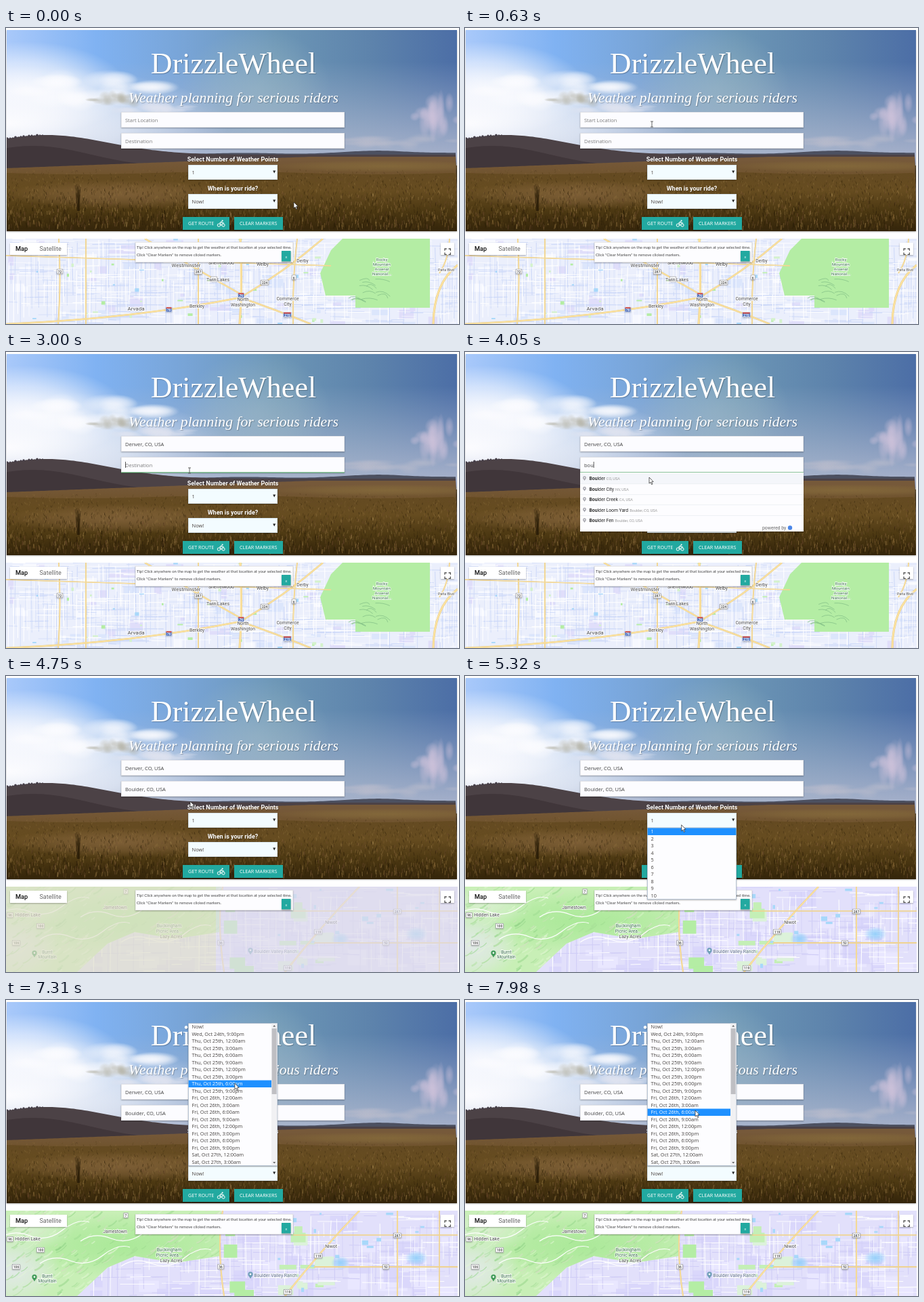
An HTML page with a canvas for the animation above (8000 ms loop, 669 by 437 pixels).

```html
<!DOCTYPE html>
<html lang="en">
<head>
<meta charset="utf-8">
<title>Ride weather planner</title>
<style>
html, body { margin: 0; width: 100%; height: 100%; overflow: hidden; background: #fff; }
canvas { display: block; width: 669px; height: 437px; }
</style>
</head>
<body>
<canvas id="stage" width="669" height="437"></canvas>
<script>
const W = 669, H = 437, LOOP = 8000, MAP_TOP = 311, MAP_W = 667;
const SANS = '"Open Sans", sans-serif', ROBOTO = 'Roboto, sans-serif';
const SERIF = '"Liberation Serif", serif', LATO = 'Lato, sans-serif';
const TEAL = '#22a9a0', GREEN = '#b4eda4', WATER = '#a8d8fa', PARK_TEXT = '#3d7050';
let g = document.getElementById('stage').getContext('2d');

// ---------- helpers ----------

function rng(seed) {
  return () => {
    seed = (seed + 0x6D2B79F5) | 0;
    let t = Math.imul(seed ^ (seed >>> 15), 1 | seed);
    t = (t + Math.imul(t ^ (t >>> 7), 61 | t)) ^ t;
    return ((t ^ (t >>> 14)) >>> 0) / 4294967296;
  };
}

function layer(paint) {
  const c = document.createElement('canvas');
  c.width = W;
  c.height = H;
  const saved = g;
  g = c.getContext('2d');
  paint();
  g = saved;
  return c;
}

function box(x, y, w, h, fill) {
  g.fillStyle = fill;
  g.fillRect(x, y, w, h);
}

function panel(x, y, w, h, fill, edge) {
  g.save();
  g.shadowColor = 'rgba(0,0,0,.3)';
  g.shadowBlur = 2;
  g.shadowOffsetY = 1;
  box(x, y, w, h, fill);
  g.restore();
  if (!edge) return;
  g.strokeStyle = edge;
  g.lineWidth = .6;
  g.strokeRect(x + .3, y + .3, w - .6, h - .6);
}

function text(s, x, y, font, color, align = 'left') {
  g.font = font;
  g.fillStyle = color;
  g.textAlign = align;
  g.fillText(s, x, y);
}

function shape(d, x, y, fill, stroke, width = .7) {
  const p = new Path2D(d);
  g.save();
  g.translate(x, y);
  if (fill) {
    g.fillStyle = fill;
    g.fill(p);
  }
  if (stroke) {
    g.strokeStyle = stroke;
    g.lineWidth = width;
    g.stroke(p);
  }
  g.restore();
}

function line(x0, y0, x1, y1, color, width = 1) {
  g.beginPath();
  g.moveTo(x0, y0);
  g.lineTo(x1, y1);
  g.strokeStyle = color;
  g.lineWidth = width;
  g.stroke();
}

function disc(x, y, r, fill) {
  g.beginPath();
  g.arc(x, y, r, 0, 7);
  g.fillStyle = fill;
  g.fill();
}

function blob(x, y, rx, ry, rgb, a) {
  g.save();
  g.translate(x, y);
  g.scale(rx, ry);
  const f = g.createRadialGradient(0, 0, 0, 0, 0, 1);
  f.addColorStop(0, `rgba(${rgb},${a})`);
  f.addColorStop(.55, `rgba(${rgb},${a * .6})`);
  f.addColorStop(1, `rgba(${rgb},0)`);
  g.fillStyle = f;
  g.fillRect(-1, -1, 2, 2);
  g.restore();
}

function fade(x1, y0, y1, ...colors) {
  const f = g.createLinearGradient(0, y0, x1, y1);
  colors.forEach((c, i) => f.addColorStop(i / (colors.length - 1), c));
  return f;
}

// ---------- hero picture ----------

function cloud(seed, x, y, w, h, rgb, a) {
  const r = rng(seed);
  for (let i = 0; i < 16; i++) {
    const u = r() * 2 - 1, k = 1 - u * u * .7;
    blob(x + u * w, y + (r() - .5) * h * k, w * (.15 + r() * .25), h * (.3 + r() * .4) * k, rgb, a);
  }
}

function ridge(height, fill) {
  g.beginPath();
  g.moveTo(0, 300);
  for (let x = 0; x <= MAP_W; x += 4) g.lineTo(x, height(x));
  g.lineTo(MAP_W, 300);
  g.fillStyle = fill;
  g.fill();
}

const bump = (x, center, width) => Math.exp(-(((x - center) / width) ** 2));

function sky() {
  box(0, 3, MAP_W, 200, fade(MAP_W, 0, 0, '#a9c9fa', '#80b2f2', '#78a4d6', '#6c96b6', '#5e84ac', '#4c6ea6'));
  box(0, 3, MAP_W, 200, fade(0, 50, 190, 'rgba(176,188,212,0)', 'rgba(176,184,206,.9)'));
  blob(0, 140, 330, 85, '252,252,255', 1);
  blob(30, 90, 150, 70, '252,252,255', .9);
  blob(370, 90, 110, 90, '164,190,198', .45);
  cloud(5, 130, 92, 110, 34, '252,252,255', .6);
  cloud(8, 165, 106, 42, 14, '176,174,160', .4);
  cloud(9, 215, 120, 60, 16, '225,228,240', .5);
  cloud(14, 636, 128, 36, 44, '206,194,218', .5);
  cloud(17, 580, 168, 90, 14, '186,188,204', .4);
}

function grass() {
  const r = rng(7), tones = ['#241806', '#38280c', '#8a6a38', '#9a7c48', '#55401a', '#6c4a30'];
  const top = x => 207 - 17 * Math.min(1, x / 450);
  ridge(top, fade(0, 195, 300, '#76593a', '#6c5026', '#53400f', '#33240a'));
  ridge(x => 214 + 2 * Math.sin(x / 70), fade(0, 210, 300, '#644a22', '#664c20', '#4c3812', '#33240a'));
  blob(170, 246, 170, 22, '142,108,70', .6);
  blob(560, 204, 170, 9, '140,114,62', .6);
  for (let i = 0; i < 3200; i++) {
    const d = r() ** .8, x = r() * MAP_W, y = 210 + d * 89;
    g.globalAlpha = .3 + r() * .4;
    line(x, y, x + (r() - .5) * 3, Math.max(top(x), y - 2 - d * 5), tones[Math.floor(r() * 6)], .5 + d * .7);
  }
  g.globalAlpha = .6;
  for (let i = 0; i < 14; i++) line(105 + r() * 4, 270, 102 + r() * 10, 230 + r() * 20, '#2c1e0a', .8);
  g.globalAlpha = 1;
}

function landscape() {
  sky();
  ridge(x => 185 - 4 * bump(x, 560, 60) - Math.sin(x / 25) * .6, '#4c5060');
  ridge(x => 190 - 3 * bump(x, 470, 60), '#5a4f45');
  const hill = x => 187 - 29 * bump(x, 60, 130);
  ridge(hill, '#4c4246');
  ridge(x => 206 - 32 * bump(x, 40, 120), '#40363a');
  for (let x = 2; x < 55; x += 4) disc(x, hill(x), 1.2 + Math.sin(x) * .7, '#463f48');
  grass();
}

function bike(x, y) {
  shape('M5.8 8.6V6.4L3.8 4.6L6 2.6L7.6 4.4H9.8', x, y, null, '#fff', 1.1);
  for (const cx of [2.3, 9]) shape('M-2.1 0a2.1 2.1 0 1 0 4.2 0a2.1 2.1 0 1 0 -4.2 0', x + cx, y + 7.6, null, '#fff', 1);
  disc(x + 7.6, y + 1.1, 1.1, '#fff');
}

function button(x, w, caption) {
  panel(x, 279, w, 19, TEAL);
  text(caption, x + 8, 291.2, `7.2px ${SANS}`, '#fff');
}

function hero() {
  panel(1, 3, 665, 297, '#33240a');
  g.save();
  g.beginPath();
  g.rect(1, 3, 665, 297);
  g.clip();
  landscape();
  g.restore();
  g.save();
  g.shadowColor = 'rgba(0,0,0,.25)';
  g.shadowBlur = 1;
  g.shadowOffsetX = g.shadowOffsetY = 1;
  text('DrizzleWheel', 336, 67, `44px ${SERIF}`, '#fff', 'center');
  text('Weather planning for serious riders', 336, 110, `italic 21.7px ${SERIF}`, '#fff', 'center');
  text('Select Number of Weather Points', 335, 196.5, `bold 9px ${ROBOTO}`, '#fff', 'center');
  text('When is your ride?', 335, 239.5, `bold 9px ${ROBOTO}`, '#fff', 'center');
  g.restore();
  button(261, 69, 'GET ROUTE');
  button(337, 72, 'CLEAR MARKERS');
  bike(312, 283.5);
}

// ---------- maps ----------

function place(s, x, y, size = 6.8, color = '#4c4c50') {
  s.split('|').forEach((row, i) => {
    g.font = `${size}px ${ROBOTO}`;
    g.textAlign = 'center';
    g.strokeStyle = 'rgba(255,255,255,.8)';
    g.lineWidth = 1.8;
    g.strokeText(row, x, y + i * (size + 1));
    text(row, x, y + i * (size + 1), g.font, color, 'center');
  });
}

function shield(s, x, y) {
  const w = s.length * 2.6 + 4, interstate = s === '76' || s === '270';
  panel(x - w / 2, y - 3.7, w, 7.4, interstate ? '#4468b8' : '#fff', interstate ? '#fff' : '#8a8a90');
  if (interstate) box(x - w / 2 + .6, y - 3.4, w - 1.2, 1.8, '#d8483c');
  text(s, x, y + 2.3, `bold 4.8px ${ROBOTO}`, interstate ? '#fff' : '#555', 'center');
}

// A curve from one point to another; u places its route number.
function road(x0, y0, x1, y1, { bend = 0, width = 1.2, sign, u = .5 } = {}) {
  const cx = (x0 + x1) / 2 + bend, cy = (y0 + y1) / 2 + bend;
  const d = `M${x0} ${y0}Q${cx} ${cy} ${x1} ${y1}`;
  shape(d, 0, 0, null, '#e4c682', width + .7);
  shape(d, 0, 0, null, '#fbe2a0', width);
  const at = (a, c, b) => (1 - u) ** 2 * a + 2 * u * (1 - u) * c + u * u * b;
  return sign ? () => shield(sign, at(x0, cx, x1), at(y0, cy, y1)) : () => {};
}

function streets(seed, x0, step, color) {
  const r = rng(seed);
  for (let x = x0; x < MAP_W; x += step * (.5 + r())) {
    const y = MAP_TOP + r() * 70;
    line(x, y, x + (r() - .5) * 3, y + 20 + r() * 80, color, .5 + r() * .7);
  }
  for (let i = 0; i < 1100 / step; i++) {
    const x = x0 + r() * (MAP_W - x0), y = MAP_TOP + r() * 126;
    line(x, y, x + 10 + r() * 60, y + (r() - .5) * 2, color, .5 + r() * .7);
  }
}

function patches(seed, x0, x1, count, size, colors) {
  const r = rng(seed);
  for (let i = 0; i < count; i++) {
    box(x0 + r() * (x1 - x0), MAP_TOP + r() * 126, size * (.3 + r()), size * (.2 + r() * .6), colors[i % colors.length]);
  }
}

function mapBase(fill, paint) {
  g.beginPath();
  g.rect(0, MAP_TOP, MAP_W, 126);
  g.clip();
  box(0, MAP_TOP, MAP_W, 126, fill);
  paint();
}

function denverMap() {
  patches(31, 0, 660, 90, 20, ['#dce6fc', '#f6f8ff', '#e0defa']);
  streets(3, 0, 6, '#ccd8f8');
  streets(4, 0, 6, '#ffffff');
  patches(6, 0, 470, 36, 7, [WATER, GREEN, '#d4f2cc']);
  shape('M497 311H626V413H516V395H472L464 362L480 328Z', 0, 0, GREEN);
  const r = rng(9);
  for (let i = 0; i < 12; i++) {
    const x = 495 + r() * 55, y = 370 + r() * 34;
    shape(`q${6 + r() * 8} ${-8 * r()} ${12 + r() * 14} ${6 * r()}`.replace(/^/, 'M0 0'), x, y, null, '#86c288', .8);
  }
  const signs = [
    road(78, 311, 77, 437, { bend: 4, sign: '72', u: .37 }),
    road(0, 336, 480, 351, { width: 1 }),
    road(118, 311, 118, 437),
    road(284, 311, 284, 437, { sign: '287', u: .39 }),
    road(205, 311, 345, 392, { bend: 3, width: 1.8, sign: '36', u: .72 }),
    road(346, 311, 345, 437, { bend: 4, width: 2.4, sign: '76', u: .65 }),
    road(0, 437, 346, 398, { bend: 12, width: 1.8, sign: '76', u: .68 }),
    road(346, 398, 468, 311, { bend: 5, width: 1.8, sign: '224', u: .28 }),
    road(346, 398, 450, 437, { bend: -3, width: 1.8, sign: '270', u: .68 }),
    road(424, 437, 430, 311, { bend: -4, sign: '6', u: .53 }),
    road(667, 350, 631, 437, { bend: -17, width: 2.4 }),
    road(655, 311, 640, 362, { bend: 6 })];
  signs.forEach(draw => draw());
  place('Westminster', 266, 352.5, 7.6);
  place('Sherrelwood', 318, 349);
  place('Twin Lakes', 313, 374);
  place('Welby', 379, 351);
  place('Derby', 438, 346);
  place('North|Washington', 350, 403);
  place('Commerce|City', 416, 402);
  place('Arvada', 192, 416.5, 8);
  place('Berkley', 282, 413);
  place('Rocky|Mountain|Arsenal|National...', 555, 343.5, 6.2, PARK_TEXT);
  place('Peña Blvd', 650, 359, 5.4);
}

function terrain() {
  const r = rng(12);
  g.save();
  g.clip(new Path2D('M0 311H318L316 378L250 388L190 378L150 395L105 437H0Z'));
  box(0, MAP_TOP, 320, 126, '#c8efb6');
  blob(170, 362, 180, 48, '168,232,150', .9);
  blob(10, 400, 70, 50, '228,232,236', .9);
  blob(30, 340, 70, 30, '220,240,212', .8);
  for (let i = 0; i < 300; i++) {
    const x = r() * 318, y = MAP_TOP + r() * 126, n = 4 + r() * 12;
    g.globalAlpha = .25 + r() * .4;
    shape(`M0 0Q${n * .5} ${-n * .1} ${n} ${-n * .7}`, x, y, null, ['#93d488', '#e2f6d4', '#a5dc94', '#d6dcc4'][i % 4], 1 + r() * 2);
  }
  g.restore();
}

function boulderMap() {
  patches(20, 100, 660, 60, 34, ['#e9e7ff', '#dad7fb']);
  streets(21, 120, 11, '#cfccf6');
  streets(22, 120, 11, '#ffffff');
  terrain();
  patches(25, 316, 340, 7, 26, [GREEN]);
  patches(26, 345, 480, 14, 22, ['#c4efb6', '#dcf2da']);
  patches(27, 330, 660, 16, 9, [WATER]);
  blob(606, 381, 17, 11, '150,208,250', 1);
  blob(494, 388, 14, 10, '150,208,250', 1);
  for (let i = 0; i < 4; i++) shape('M0 0q20 -14 45 -4t48 -8t40 -12', i * 60 - 10, 352 + (i * 37) % 70, null, '#fff', 1.2);
  const signs = [
    road(320, 311, 322, 437, { bend: -10, width: 1.4, sign: '36', u: .69 }),
    road(412, 437, 522, 311, { bend: -3, width: 1.8, sign: '119', u: .46 }),
    road(578, 311, 578, 437, { width: 1.4, sign: '287', u: .29 }),
    road(455, 394, 667, 394, { sign: '52' }),
    road(424, 347, 667, 347, { width: .8 }),
    road(640, 311, 640, 437, { width: .8 })];
  signs.forEach(draw => draw());
  shield('7', 177, 318);
  shield('96', 6, 353);
  shield('100', 51, 369);
  shield('106', 15, 394);
  shield('119', 416, 431);
  place('Hidden Lake', 32, 354.5);
  place('Jamestown', 161, 343.5);
  place('Buckingham|Picnic Area...', 241, 371, 6.6, PARK_TEXT);
  place('Lazy Acres', 244, 386.5);
  place('Burnt|Mountain', 61, 409.5, 6.4, PARK_TEXT);
  place('Boulder Valley Ranch', 398, 409, 6.8, '#5a6a88');
  place('Niwot', 480, 366);
  pin(42, 410, '#3f9a58', 1.5);
  pin(361, 406, '#6f9fb8', 1.5);
}

function pin(x, y, color, k = 1) {
  disc(x, y - .8 * k, 2.4 * k, color);
  shape(`M${-2.2 * k} 0H${2.2 * k}L0 ${3.6 * k}Z`, x, y, color);
  disc(x, y - .8 * k, .9 * k, '#fff');
}

function mapControls() {
  panel(6, 317, 84, 18, '#fff');
  text('Map', 14, 328.6, `500 9.2px ${ROBOTO}`, '#111');
  text('Satellite', 49.5, 328.6, `9px ${ROBOTO}`, '#666');
  panel(642, 317, 20, 18, '#fff');
  for (const sx of [1, -1])
    for (const sy of [1, -1])
      shape(`M${1.4 * sx} ${4.2 * sy}H${4.2 * sx}V${1.4 * sy}`, 652.2, 330.2, null, '#555', 1.3);
  panel(191, 316, 233, 30, '#fdfdff', '#ddd');
  const font = `5.9px ${LATO}`;
  text('Tip! Click anywhere on the map to get the weather at that location at your selected time.', 193, 326, font, '#444');
  text('Click "Clear Markers" to remove clicked markers.', 193, 337, font, '#444');
  panel(407, 329, 13.5, 15.5, TEAL);
  text('x', 413.7, 339.5, `6px ${SANS}`, '#fff', 'center');
}

const TOP = layer(hero);
const DENVER = layer(() => mapBase('#ebeffc', denverMap));
const BOULDER = layer(() => mapBase('#e2e0fb', boulderMap));
const CONTROLS = layer(mapControls);

// ---------- form ----------

const TIP_STEP = 15.5, ROW = 10.5;
const START_TIPS = {
  y: 147,
  rows: ['Denver|CO, USA',
    'Denver Hall of Rivers & Lanterns|Larkmoor Boulevard, Denver, CO, USA',
    'Denver Loom Yard|Greenwood Village, CO, USA',
    'Denver Crumpet Pantry|East Thornby Avenue, Denver, CO, USA',
    'Denver Fen|Wickle Street, Denver, CO, USA']
};
const END_TIPS = {
  y: 178,
  rows: ['Boulder|CO, USA', 'Boulder City|NV, USA', 'Boulder Creek|CA, USA',
    'Boulder Loom Yard|Boulder, CO, USA', 'Boulder Fen|Boulder, CO, USA']
};

function rideTime(i) {
  if (!i) return 'Now!';
  const hours = 21 + (i - 1) * 3, day = Math.floor(hours / 24), h = hours % 24;
  return `${['Wed', 'Thu', 'Fri', 'Sat'][day]}, Oct ${24 + day}th, ${h % 12 || 12}:00${h < 12 ? 'am' : 'pm'}`;
}

const COUNTS = { y: 224, rows: Array.from({ length: 10 }, (_, i) => String(i + 1)) };
const TIMES = { y: 34, scroll: true, rows: Array.from({ length: 20 }, (_, i) => rideTime(i)) };
const rowY = (list, i) => list.y + i * ROW + 3;

// Moments at which the form changes, in ms.
const AT = {
  focusStart: 800, typeStart: 1240, pickStart: 2250, focusEnd: 2720, typeEnd: 3380,
  pickEnd: 4300, pan: 4600, openCount: 5190, pickCount: 5720, openTime: 6460
};

// Each move: start, end, destination.
const MOVES = [
  [60, 600, 276, 142], [900, 1150, 271, 138], [1750, 2100, 269, START_TIPS.y + 7],
  [AT.pickStart + 100, 2700, 271, 175], [3700, 4050, 272, END_TIPS.y + 7],
  [4850, 5120, 318, 212], [AT.openCount + 40, 5580, 328, rowY(COUNTS, 3)],
  [AT.pickCount + 60, 6050, 327, 251], [AT.openTime - 20, 7380, 338, rowY(TIMES, 8)],
  [7400, 7820, 340, rowY(TIMES, 12)]];

function mouseAt(t) {
  let x = 425, y = 257;
  for (const [from, to, tx, ty] of MOVES) {
    const u = Math.min(1, Math.max(0, (t - from) / (to - from))), e = u * u * (3 - 2 * u);
    x += (tx - x) * e;
    y += (ty - y) * e;
  }
  return [x, y];
}

const typed = (t, word, from, pace) => word.slice(0, Math.max(0, Math.floor((t - from) / pace) + 1));

function field(y, value, hint, focused, blink) {
  panel(170, y, 330, 23, '#fcfcff', '#d8d8dc');
  text(value || hint, 176, y + 14.6, `7.5px ${SANS}`, value ? '#404040' : '#7c7c7c');
  if (!focused) return;
  box(170, y + 22.4, 330, 1, '#57b56a');
  if (blink) box(176 + (value ? g.measureText(value).width : 0), y + 7, .8, 9, '#333');
}

function select(y, value) {
  panel(269, y, 132, 22, '#f3fcff', '#c4d0d8');
  text(value, 274.5, y + 13.6, `7.5px ${SANS}`, '#453c38');
  shape('M-2 0H2L0 4Z', 396.2, y + 8.4, '#222');
}

function suggestions({ y, rows }, prefix, my) {
  panel(170, y, 330, 87, '#fdfdff');
  rows.forEach((row, i) => {
    const [name, address] = row.split('|'), top = y + 1 + i * TIP_STEP, base = top + 10;
    if (my >= top && my < top + TIP_STEP) box(170, top, 330, TIP_STEP, '#f4f6fa');
    if (i) box(170, top, 330, .6, '#e4eaee');
    pin(176.5, base - 2.5, '#a8a8b0');
    let x = 183.5;
    const run = (s, font, color) => {
      text(s, x, base, font, color);
      x += g.measureText(s).width;
    };
    run(name.slice(0, prefix), `500 6.8px ${ROBOTO}`, '#111');
    run(name.slice(prefix), `6.8px ${ROBOTO}`, '#222');
    x += 2;
    run(address, `5.5px ${ROBOTO}`, '#999');
  });
  text('powered by', 439, y + 84, `6.9px ${ROBOTO}`, '#666');
  disc(480, y + 81.5, 3.2, '#4a86e8');
}

function options({ y, rows, scroll }, my) {
  const h = rows.length * ROW, hit = Math.floor((my - y - .5) / ROW);
  const active = hit >= 0 && hit < rows.length ? hit : 0;
  panel(269, y, 132, h + 1, '#fdfdff', '#8aa0b8');
  rows.forEach((s, i) => {
    const top = y + .5 + i * ROW;
    if (i === active) box(269.6, top, scroll ? 122.4 : 130.8, ROW, '#1e90ff');
    text(s, 274.5, top + 7.9, `7.3px ${SANS}`, i === active ? '#fff' : '#45413e');
  });
  if (!scroll) return;
  box(392, y + .6, 8.4, h - .4, '#f1f1f3');
  box(392.6, y + 8, 7, 97, '#bfbfc3');
  shape('M-2 1H2L0 -1.5Z', 396.2, y + 4.5, '#666');
  shape('M-2 -1H2L0 1.5Z', 396.2, y + h - 4, '#666');
}

function cursor(x, y, beam) {
  if (beam) shape('M-2 -4H2M-2 4H2M0 -4V4', x, y, null, '#555', .9);
  else shape('M0 0V9L2 7.2L3.6 10.6L5 10L3.5 6.7L6.2 6.5Z', x, y, '#fff', '#222');
}

function drawMap(t) {
  if (t < AT.pan) {
    g.drawImage(DENVER, 0, 0);
  } else {
    box(0, MAP_TOP, MAP_W, 126, '#dfddea');
    box(0, MAP_TOP, 310, 126, '#e0dfcb');
    g.globalAlpha = Math.min(1, .3 + .7 * Math.max(0, (t - AT.pan - 250) / 200));
    g.drawImage(BOULDER, 0, 0);
    g.globalAlpha = 1;
  }
  g.drawImage(CONTROLS, 0, 0);
}

function draw(t) {
  const [mx, my] = mouseAt(t);
  const within = (from, to) => t >= from && t < to;
  const blink = t % 1000 < 620;
  const start = t >= AT.pickStart ? 'Denver, CO, USA' : typed(t, 'de', AT.typeStart, 200);
  const end = t >= AT.pickEnd ? 'Boulder, CO, USA' : typed(t, 'bou', AT.typeEnd, 140);
  const startTips = within(AT.typeStart + 120, AT.pickStart);
  const timing = t >= AT.openTime;

  box(0, 0, W, H, '#fff');
  g.drawImage(TOP, 0, 0);
  drawMap(t);
  field(124, start, 'Start Location', within(AT.focusStart, AT.focusEnd), blink);
  field(155, end, 'Destination', within(AT.focusEnd, AT.pickEnd + 200), blink);
  select(202, t >= AT.pickCount ? '4' : '1');
  select(245, 'Now!');
  if (startTips) suggestions(START_TIPS, start.length, my);
  if (within(AT.typeEnd + 160, AT.pickEnd)) suggestions(END_TIPS, end.length, my);
  if (within(AT.openCount, AT.pickCount)) options(COUNTS, my);
  if (timing) options(TIMES, my);

  const inField = [124, 155].some(y => my > y && my < y + 23);
  cursor(mx, my, inField && mx > 170 && mx < 500 && !timing && !(startTips && my > START_TIPS.y));
}

function tick(now) {
  draw(now % LOOP);
  requestAnimationFrame(tick);
}
requestAnimationFrame(tick);
</script>
</body>
</html>
```
